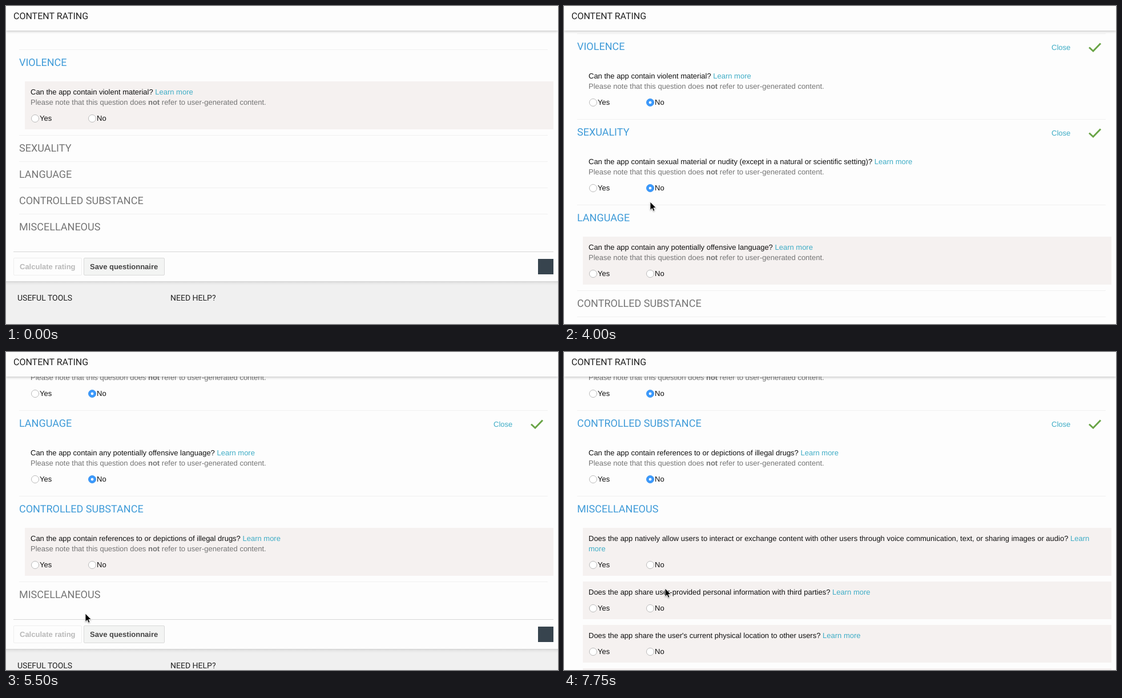
These frames come from a looping animation (967x557 px, 8 s). An HTML page:

```html
<!DOCTYPE html>
<html lang="en">
<head>
<meta charset="utf-8">
<title>Content rating</title>
<style>
* { box-sizing: border-box; }
html, body { margin: 0; width: 100%; height: 100%; overflow: hidden; }
body { position: relative; background: #fdfdfd; color: #111; font: 13px/18px "Liberation Sans", Arial, sans-serif; text-rendering: geometricPrecision; }
header { position: absolute; inset: 0 0 auto; height: 43px; padding-left: 13px; background: #fdfdfd; box-shadow: 0 1px 5px rgba(0,0,0,.27); font: 16px/35px Roboto, sans-serif; color: #212121; }
#page { position: absolute; left: 23px; top: 76px; width: 926px; }
section { position: relative; border-top: 1px solid #f0f0f0; }
h2 { margin: 0; height: 45px; font: 18px/45px Roboto, sans-serif; color: #757575; }
.open h2 { color: #3f9bd8; }
.body, .mark { display: none; }
.open .body { display: block; padding: 10px 0; }
.done .mark { display: block; }
.mark { position: absolute; left: 831px; top: 15px; color: #3fadc6; }
.mark svg { position: absolute; left: 64px; top: 0; fill: none; stroke: #69a446; stroke-width: 3; }
.panel { margin: 0 -10px 10px 10px; padding: 10px; background: #f5f1f0; }
.panel:last-child { margin-bottom: 0; }
.done .panel { background: none; }
.panel a { color: #3fadc6; }
.note { color: #757575; }
.row { position: relative; height: 18px; margin-top: 10px; }
.row * { position: absolute; left: 16px; }
.row i { left: 1px; top: 2px; width: 14px; height: 14px; border: 1px solid #b9b9b9; border-radius: 50%; background: #fff; }
.row .no { left: 116px; }
.row i.no { left: 101px; }
.press i.no { background: #e3e5e3; border-color: #a0a0a0; }
.done i.no { border-color: #3b93ee; background: radial-gradient(#fff 2px, #3b99fc 2.7px); }
#end { position: relative; margin: 20px -10px 0; height: 52px; border-top: 1px solid #d6d6d6; }
#end * { position: absolute; top: 10px; height: 31px; border: 1px solid #d9d9d9; border-radius: 2px; font-weight: bold; line-height: 29px; padding-left: 10px; white-space: nowrap; }
#calc { left: 0; width: 120px; color: #b9b9b9; border-color: #eee !important; }
#save { left: 123px; width: 142px; color: #444; background: #f3f4f3; }
#end #logo { right: 0; top: 12px; width: 27px; height: 27px; border: 0; border-radius: 0; background: #37444e; }
footer { position: relative; margin-left: -23px; width: 967px; height: 300px; background: linear-gradient(#d2d2d2, #e6e6e6 3px, #f0f0f0 7px); font: 14px/20px Roboto, sans-serif; color: #212121; }
footer span { position: absolute; left: 20px; top: 20px; }
footer span + span { left: 288px; }
#cursor { position: absolute; left: 0; top: 0; overflow: visible; filter: drop-shadow(0 1px 1px rgba(0,0,0,.3)); }
</style>
</head>
<body>
<div id="page"></div>
<header>CONTENT RATING</header>
<svg id="cursor" width="12" height="18"><path d="M0 0V14.5L3.4 11.4 5.6 16.4 8 15.3 5.9 10.6H10.3Z" stroke="#fff" stroke-width=".9"/></svg>
<script>
const STEP = 250, LOOP = 8000;
const note = '<div class="note">Please note that this question does <b>not</b> refer to user-generated content.</div>';
const row = '<div class="row"><i></i><span>Yes</span><i class="no"></i><span class="no">No</span></div>';
const panel = (text, extra = '') => `<div class="panel"><div>${text} <a>Learn more</a></div>${extra}${row}</div>`;

const topics = [
  ['VIOLENCE', panel('Can the app contain violent material?', note)],
  ['SEXUALITY', panel('Can the app contain sexual material or nudity (except in a natural or scientific setting)?', note)],
  ['LANGUAGE', panel('Can the app contain any potentially offensive language?', note)],
  ['CONTROLLED SUBSTANCE', panel('Can the app contain references to or depictions of illegal drugs?', note)],
  ['MISCELLANEOUS',
    panel('Does the app natively allow users to interact or exchange content with other users through voice communication, text, or sharing images or audio?') +
    panel('Does the app share user-provided personal information with third parties?') +
    panel("Does the app share the user's current physical location to other users?") +
    '<div class="panel">&nbsp;</div>']
];
const page = document.getElementById('page');
const cursor = document.getElementById('cursor');
page.innerHTML = topics.map(([name, body]) => `<section><h2>${name}</h2>
  <div class="mark">Close<svg width="26" height="22"><path d="M2 8.5L9 15 22 1.5"/></svg></div>
  <div class="body">${body}</div></section>`).join('') +
  `<div id="end"><div id="calc">Calculate rating</div><div id="save">Save questionnaire</div><div id="logo"></div></div>
  <footer><span>USEFUL TOOLS</span><span>NEED HELP?</span></footer>`;
const sections = [...page.querySelectorAll('section')];

// When each "No" is chosen; the next topic opens one step later.
const chosen = [2250, 3750, 4750, 7000, Infinity];
// [time, scroll offset]
const scroll = [[3750, 0], [4000, 28], [4500, 159], [5000, 159], [5500, 274], [6000, 262], [7250, 262], [7750, 424]];
// [time, x, y]
const pointer = [[250, 86, 198], [1000, 154, 201], [1250, 147, 201], [2250, 147, 201], [2750, 112, 200],
  [3250, 145, 350], [3750, 150, 342], [4000, 151, 343], [4500, 153, 348], [4750, 150, 338], [5000, 148, 345],
  [5500, 139, 458], [6250, 140, 392], [6500, 140, 386], [6750, 140, 386], [7000, 148, 385], [7250, 149, 388], [7750, 177, 414]];

function at(keys, t) {
  const n = keys.findIndex(k => k[0] > t);
  if (n < 0) return keys[keys.length - 1].slice(1);
  if (n === 0) return keys[0].slice(1);
  const a = keys[n - 1], b = keys[n], f = (t - a[0]) / (b[0] - a[0]);
  return a.slice(1).map((v, i) => Math.round(v + (b[i + 1] - v) * f));
}

function draw(t) {
  sections.forEach((s, i) => {
    s.classList.toggle('open', !i || t >= chosen[i - 1] + STEP);
    s.classList.toggle('done', t >= chosen[i]);
    s.classList.toggle('press', !i && t >= 1750 && t < chosen[0]);
  });
  page.style.top = 76 - at(scroll, t)[0] + 'px';
  const [x, y] = at(pointer, t);
  cursor.style.left = x + 'px';
  cursor.style.top = y + 'px';
  cursor.style.display = t < STEP ? 'none' : 'block';
}

const start = performance.now();
function frame() {
  const t = (performance.now() - start) % LOOP;
  draw(Math.floor(t / STEP) * STEP);
  requestAnimationFrame(frame);
}
frame();
</script>
</body>
</html>
```
